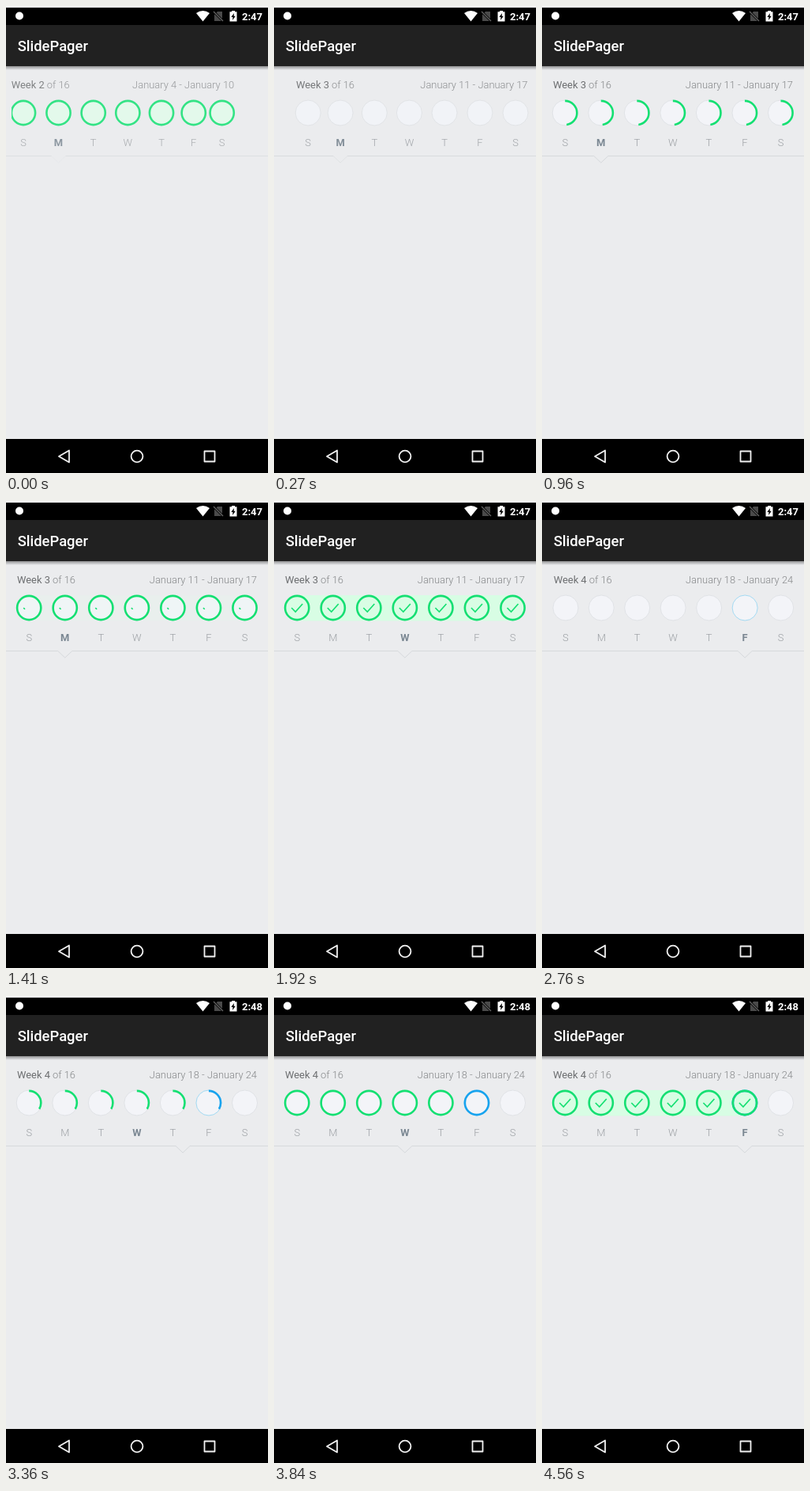
Recreate the animation shown at these times as an HTML page with a canvas. Size 332 by 590 pixels, loop 5990 ms.

```html
<!DOCTYPE html>
<html lang="en">
<head>
<meta charset="utf-8">
<title>SlidePager</title>
<style>
  html, body { margin: 0; width: 100%; height: 100%; overflow: hidden; background: #ebecee; }
  canvas { display: block; width: 332px; height: 590px; }
</style>
</head>
<body>
<canvas id="stage" width="332" height="590"></canvas>
<script>
const ctx = document.getElementById('stage').getContext('2d');
const W = 332, H = 590, LOOP = 5990, STEP = 30;
const BG = '#ebecee', GREEN = '#14e072', BLUE = '#18a3ee', MINT = '#d8fde4', PALE = '#f3f4f8';
const DAYS = 'SMTWTFS', ROW_Y = 135, LINE_Y = 189.5;

const clamp = v => Math.max(0, Math.min(1, v));
const progress = (t, start, duration) => clamp((t - start) / duration);
const ease = x => (1 - Math.cos(Math.PI * x)) / 2;
const dayX = i => 29.2 + 45.55 * i;

// Finger drag at constant speed, then a quintic settle.
function swipe(t, start) {
  const u = t - start;
  if (u <= 0) return 0;
  return u < 90 ? 0.0031 * u : 1 - 0.721 * (1 - progress(u, 90, 480)) ** 5;
}

function withAlpha(alpha, draw) {
  if (alpha <= 0) return;
  ctx.save();
  ctx.globalAlpha *= alpha;
  draw();
  ctx.restore();
}

function text(str, x, y, size, weight, color, align = 'left') {
  ctx.font = `${weight} ${size}px Roboto, sans-serif`;
  ctx.fillStyle = color;
  ctx.textAlign = align;
  ctx.fillText(str, x, y);
}

function disc(x, y, r, color) {
  ctx.beginPath();
  ctx.arc(x, y, r, 0, 2 * Math.PI);
  ctx.fillStyle = color;
  ctx.fill();
}

function arc(x, y, r, part, color, width) {
  if (part <= 0) return;
  ctx.beginPath();
  ctx.arc(x, y, r, -Math.PI / 2, (2 * part - 0.5) * Math.PI);
  ctx.strokeStyle = color;
  ctx.lineWidth = width;
  ctx.stroke();
}

function polygon(points, color) {
  ctx.beginPath();
  points.forEach(([x, y]) => ctx.lineTo(x, y));
  ctx.closePath();
  ctx.fillStyle = color;
  ctx.fill();
}

function checkMark(x, part) {
  const first = clamp(part / 0.36), second = clamp((part - 0.36) / 0.64);
  ctx.beginPath();
  ctx.moveTo(x - 7, ROW_Y);
  ctx.lineTo(x - 7 + 5 * first, ROW_Y + 5 * first);
  if (second > 0) ctx.lineTo(x - 2 + 9 * second, ROW_Y + 5 - 10 * second);
  ctx.strokeStyle = GREEN;
  ctx.lineWidth = 1.7;
  ctx.stroke();
}

function dividerLine(arrowX, arrowAlpha) {
  ctx.strokeStyle = '#d6d9dc';
  ctx.lineWidth = 1;
  ctx.beginPath();
  ctx.moveTo(0, LINE_Y);
  ctx.lineTo(arrowX - 9, LINE_Y);
  ctx.moveTo(arrowX + 9, LINE_Y);
  ctx.lineTo(W, LINE_Y);
  ctx.stroke();
  withAlpha(arrowAlpha, () => {
    ctx.beginPath();
    ctx.moveTo(arrowX - 9, LINE_Y);
    ctx.lineTo(arrowX, LINE_Y + 8.5);
    ctx.lineTo(arrowX + 9, LINE_Y);
    ctx.stroke();
  });
}

// shift: share of the page width, negative while leaving, positive while entering.
function drawPage({ week, dates, done, today }, shift, { ring, check, arrow, selected }) {
  const away = Math.abs(shift);
  const offset = i => shift * W * 2 / (shift < 0 ? 8 - i : 2 + i);
  const xOf = i => dayX(i) + offset(i);
  const soft = clamp(1 - 3.6 * away), quick = clamp(1 - 12 * away);

  withAlpha(clamp(1 - 1.8 * away), () => {
    const x = 14 + offset(0), label = `Week ${week}`;
    text(label, x, 103.7, 12.9, 400, '#6c6e70');
    const width = ctx.measureText(label).width;
    text(' of 16', x + width, 103.7, 12.9, 300, '#858789');
    text(dates, 318 + offset(6), 103.7, 12.9, 300, '#858789', 'right');

    ctx.save();
    ctx.beginPath();
    ctx.rect(7, 90, W, 95);
    ctx.clip();
    withAlpha(check * quick, () => {
      ctx.fillStyle = MINT;
      ctx.fillRect(xOf(0), 119, xOf(done - 1) - xOf(0), 32.5);
    });
    for (let i = 0; i < 7; i++) {
      const cx = xOf(i), isToday = i === today;
      disc(cx, ROW_Y, 16, PALE);
      arc(cx, ROW_Y, 16, 1, isToday ? '#8fd3f2' : '#dcdfe2', 0.8);
      if (i < done) {
        withAlpha(check * soft, () => disc(cx, ROW_Y, 15.5, MINT));
        arc(cx, ROW_Y, 15.1, ring, isToday ? BLUE : GREEN, 2.6);
        if (isToday) withAlpha(check, () => arc(cx, ROW_Y, 15.1, 1, GREEN, 2.6));
        if (check > 0) withAlpha(quick, () => checkMark(cx, check));
      }
      const bold = i === selected;
      text(DAYS[i], cx, 176.5, 12.9, bold ? 700 : 300, bold ? '#7a8792' : '#9b9fa3', 'center');
    }
    ctx.restore();
  });
  withAlpha(soft, () => dividerLine(xOf(arrow), clamp(1 - 8 * away)));
}

function drawChrome(clock) {
  ctx.fillStyle = '#fff';
  ctx.fillRect(0, 0, W, 2);
  ctx.fillStyle = '#000';
  ctx.fillRect(0, 2, W, 22);
  ctx.fillRect(0, 547, W, 43);
  ctx.fillStyle = '#212121';
  ctx.fillRect(0, 24, W, 52);
  const shadow = ctx.createLinearGradient(0, 76, 0, 81);
  shadow.addColorStop(0, 'rgba(0,0,0,.38)');
  shadow.addColorStop(1, 'rgba(0,0,0,0)');
  ctx.fillStyle = shadow;
  ctx.fillRect(0, 76, W, 5);
  text('SlidePager', 14.7, 57, 18.4, 500, '#fff');

  disc(17, 12.5, 5, '#fff');
  ctx.beginPath();
  ctx.moveTo(249.5, 19.5);
  ctx.lineTo(241, 9);
  ctx.quadraticCurveTo(249.5, 3, 258, 9);
  ctx.closePath();
  ctx.fillStyle = '#fff';
  ctx.fill();
  polygon([[268, 7], [274, 7], [274, 19], [264, 19], [264, 11]], '#4a4a4a');
  ctx.strokeStyle = '#000';
  ctx.lineWidth = 3;
  ctx.beginPath();
  ctx.moveTo(263, 7);
  ctx.lineTo(275, 19);
  ctx.stroke();
  ctx.strokeStyle = '#666';
  ctx.lineWidth = 1.2;
  ctx.stroke();
  ctx.fillStyle = '#fff';
  ctx.fillRect(286, 6, 4, 2);
  ctx.fillRect(283.5, 7.3, 9, 12.2);
  polygon([[289, 9], [285.3, 14], [287.5, 14], [287, 18], [290.8, 12.8], [288.6, 12.8]], '#000');
  text(clock, 325, 18, 13, 700, '#fff', 'right');

  ctx.strokeStyle = '#f2f2f2';
  ctx.lineWidth = 1.8;
  ctx.lineJoin = 'round';
  ctx.beginPath();
  ctx.moveTo(80, 561.5);
  ctx.lineTo(67, 569);
  ctx.lineTo(80, 576.5);
  ctx.closePath();
  ctx.stroke();
  arc(166, 569, 7.4, 1, '#f2f2f2', 1.8);
  ctx.strokeRect(251.5, 562.5, 13, 13);
  ctx.lineJoin = 'miter';
}

const weeks = [
  { week: 2, dates: 'January 4 - January 10', done: 7, today: -1 },
  { week: 3, dates: 'January 11 - January 17', done: 7, today: -1 },
  { week: 4, dates: 'January 18 - January 24', done: 6, today: 5 }
];

function draw(t) {
  ctx.fillStyle = BG;
  ctx.fillRect(0, 0, W, H);
  const first = swipe(t, -28), second = swipe(t, 2340);

  if (first < 1) drawPage(weeks[0], -first, { ring: 1, check: 1, arrow: 1, selected: 1 });
  if (second < 1) {
    drawPage(weeks[1], second > 0 ? -second : 1 - first, {
      ring: ease(progress(t, 595, 750)),
      check: progress(t, 1350, 470),
      arrow: 1 + 2 * ease(progress(t, 1530, 390)),
      selected: t < 1530 ? 1 : 3
    });
  }
  if (second > 0) {
    const back = ease(progress(t, 3200, 390)), forth = ease(progress(t, 4170, 390));
    drawPage(weeks[2], 1 - second, {
      ring: ease(progress(t, 3065, 750)),
      check: progress(t, 3840, 480),
      arrow: 5 - 2 * back + 2 * forth,
      selected: t >= 3200 && t < 4170 ? 3 : 5
    });
  }
  drawChrome(t < 3360 ? '2:47' : '2:48');
}

function tick() {
  const t = performance.now() % LOOP;
  draw(Math.floor(t / STEP) * STEP);
  requestAnimationFrame(tick);
}
tick();
</script>
</body>
</html>
```
